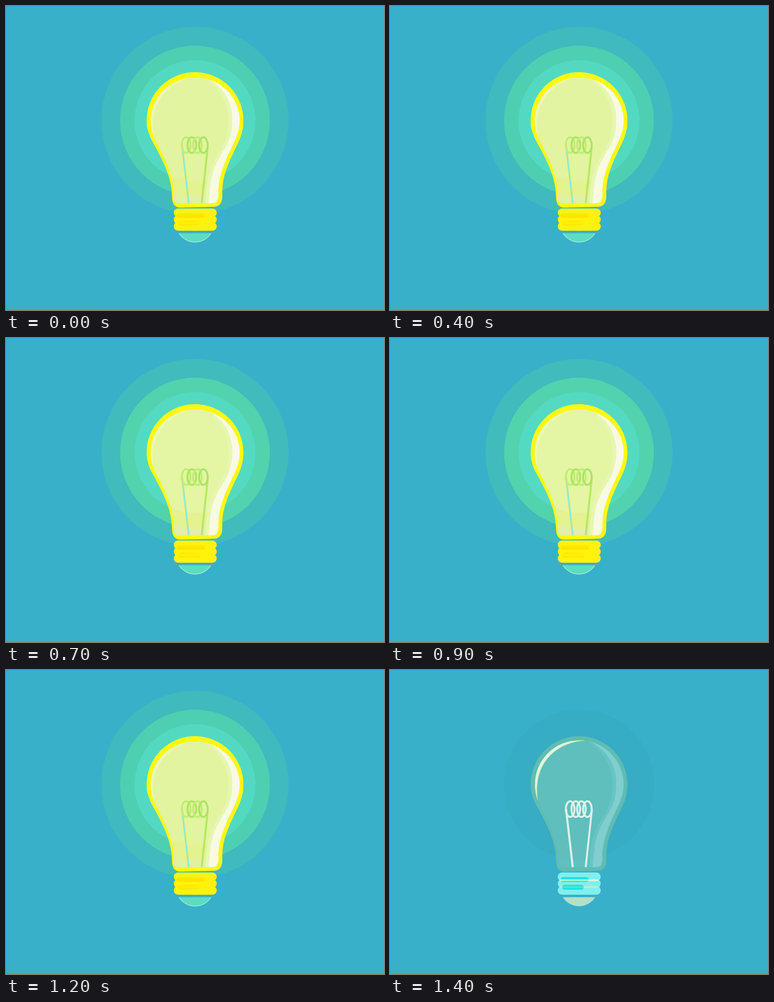
These frames come from a looping animation (835 px wide and 671 px high, 3.4 s). An HTML page:

```html
<!DOCTYPE html>
<html lang="en">
<head>
<meta charset="utf-8">
<title>Light bulb</title>
<style>
  html, body { margin: 0; width: 100%; height: 100%; overflow: hidden; background: #39b0c9; }
  svg { display: block; width: 100%; height: 100%; }
</style>
</head>
<body>
<svg id="stage" viewBox="0 0 835 671" fill="none">
  <defs><clipPath id="inside"><path class="glass"/></clipPath></defs>

  <circle cx="417.5" cy="252.5" r="206.5" fill="var(--outer)"/>
  <circle cx="417.5" cy="253" r="165.5" fill="var(--middle)" stroke="var(--rim)"/>
  <circle cx="417.5" cy="253" r="133.5" fill="var(--inner)"/>

  <path fill="var(--shell)" d="M310.5 253A107 107 0 0 1 524.5 253C524.5 273 519 290 510 308
    C494 341 479 372 478 405Q478 415 477.5 424Q476 442 460 443L386 445Q368 445 367 425
    Q366.5 415 365.5 404C362 372 346 340 325 302C316 286 310.5 270 310.5 253Z"/>

  <g clip-path="url(#inside)">
    <rect x="300" y="140" width="240" height="310" fill="var(--low)"/>
    <circle cx="417.5" cy="253" r="165.5" fill="var(--mid)"/>
    <circle cx="417.5" cy="253" r="133.5" fill="var(--body)"/>
    <path fill="var(--band)" d="M440 440Q440 410 444 392C449 357 464 335 478 311
      C488 293 492 272 492 252C492 214 473 180 436 157L540 140V440Z"/>
    <path fill="var(--gloss)" d="M447 440Q449 420 451 398C455 360 470 336 486 310
      C496 293 500 272 500 250C500 212 482 180 445 159L540 140V440Z"/>
    <path fill="var(--shine)" stroke="var(--edge)" stroke-width="1" d="M326 287C319 268 318 240 326 217
      C340 177 376 153 431 155.5C384 158 347 184 332 222C324 243 323 264 326 287Z"/>
  </g>

  <g id="wire" stroke-linecap="round">
    <path stroke="var(--legA)" stroke-width="4.6" d="M389 308L403.5 433.5"/>
    <path stroke="var(--legCore)" stroke-width="2.6" d="M389.3 311L403.3 433"/>
    <path stroke="var(--legB)" stroke-width="4.2" d="M446 308L432.5 433.5"/>
  </g>

  <g id="screw"></g>
  <path fill="var(--foot)" d="M381.8 501.5H453.2A42 42 0 0 1 381.8 501.5Z"/>
  <path stroke="var(--footRim)" stroke-width="1.4" d="M382.5 502A41.6 41.6 0 0 0 452.5 502"/>
</svg>
<script>
const stage = document.getElementById('stage');
const NS = 'http://www.w3.org/2000/svg';

function add(parent, tag, attrs) {
  const el = document.createElementNS(NS, tag);
  for (const key in attrs) el.setAttribute(key, attrs[key]);
  parent.append(el);
}

const pill = (x, y, w, h, fill) =>
  add(document.getElementById('screw'), 'rect', { x, y, width: w, height: h, rx: h / 2, fill });

[398, 410.4, 422.8, 436].forEach((cx, i) => add(document.getElementById('wire'), 'ellipse', {
  cx, cy: 307, rx: 9.6, ry: 17.4, 'stroke-width': 4.2, stroke: `var(--coil${i % 2})`
}));

for (const y of [447, 462, 477]) pill(370.5, y, 95, 19, 'var(--screw)');
pill(377, 457, 62, 11, 'var(--groove)');
pill(380, 474, 48, 11, 'var(--groove)');
pill(375, 462, 86, 4, 'var(--seam)');
pill(375, 477, 86, 4, 'var(--seam2)');
pill(377, 462, 62, 4, 'var(--seamIn)');
pill(380, 477, 48, 4, 'var(--seamIn2)');

const bright = {
  outer: '#40babd', middle: '#4ecfb2', rim: 'none', inner: '#53d9c2',
  shell: '#fff714', low: '#e1f1a2', mid: '#e4f28f', body: '#e2f4a0',
  band: '#e8f6b2', gloss: '#f8fbe1', shine: '#eaf7b8', edge: 'none',
  coil0: '#c3ec70', coil1: '#a9e566', legA: '#c3ed8f', legCore: '#8cebd0', legB: '#b3e862',
  screw: '#fff30c', groove: '#ffe900', seam: '#fff30c', seam2: '#fff30c',
  seamIn: '#ffe100', seamIn2: '#ffef08',
  foot: '#5ddcc2', footRim: '#a3f0db', top: 158
};
const flicker = { ...bright, outer: '#41bbbc', middle: '#52d3ad', inner: '#54d9c3', body: '#e4f5a4', mid: '#e4f291' };
const fading = {
  outer: '#3bb3c0', middle: '#3ab2c1', rim: '#37adbb', inner: '#38aec2',
  shell: '#65c0a2', low: '#60c0c0', mid: '#60bfbc', body: '#5fbfbd',
  band: '#6bc5c4', gloss: '#86d1ce', shine: '#e0f5df', edge: '#b5e8a4',
  coil0: '#dcf2ec', coil1: '#dcf2ec', legA: '#dcf2ec', legCore: '#dcf2ec', legB: '#dcf2ec',
  screw: '#80efee', groove: '#25e0e0', seam: '#d5f8e4', seam2: '#a9f3da',
  seamIn: '#9df8d3', seamIn2: '#49e5da',
  foot: '#b5e0c6', footRim: 'none', top: 155
};
const dark = {
  ...fading, outer: 'none', middle: '#37adc3', rim: '#37adc3', inner: '#37acc2',
  shell: '#5fbcb3', gloss: '#80ced0', band: '#69c3c4'
};

const glass = top => `M320 253A98 ${253 - top} 0 0 1 516 253C516 271 510 288 502 304
  C486 337 470 372 469 408Q469.5 416 469 423Q467 434 458 435L380 435.5Q371 435 371 425
  Q371 414 370.5 404C367 372 353 340 333 302C324 286 320 270 320 253Z`;

const LOOP = 3400, STEP = 100, LIT_STEPS = 13;
const start = performance.now();
let shown;

function look(time) {
  const step = Math.floor(time / STEP);
  if (step < LIT_STEPS) return step % 2 ? flicker : bright;
  return step === LIT_STEPS ? fading : dark;
}

function paint() {
  const next = look((performance.now() - start) % LOOP);
  if (next !== shown) {
    shown = next;
    const { top, ...colours } = next;
    for (const name in colours) stage.style.setProperty('--' + name, colours[name]);
    stage.querySelector('.glass').setAttribute('d', glass(top));
  }
  requestAnimationFrame(paint);
}
paint();
</script>
</body>
</html>
```
